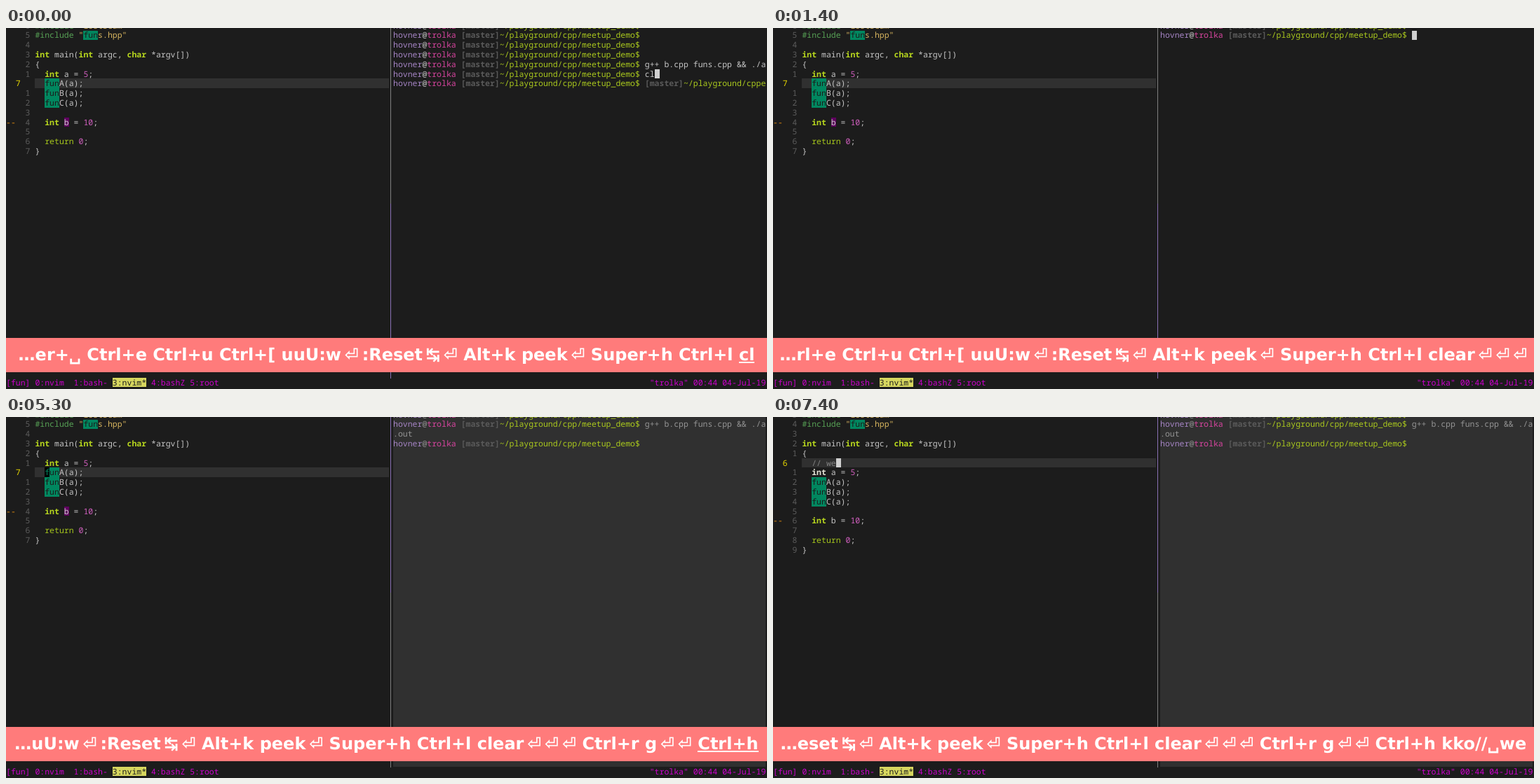
An HTML page that plays this animation: 1085x516 px, repeating every 8000 ms.

```html
<!DOCTYPE html>
<html lang="en">
<head>
<meta charset="utf-8">
<title>Terminal session</title>
<style>
  html, body { margin: 0; width: 100%; height: 100%; overflow: hidden; background: #1c1c1c; }
  svg { display: block; width: 1085px; height: 516px; }
  text { white-space: pre; text-rendering: geometricPrecision; }
  rect { shape-rendering: crispEdges; }
  #screen { font: 11.5px "Noto Sans Mono", "DejaVu Sans Mono", monospace; }
  #keys { font: bold 24px "DejaVu Sans", sans-serif; fill: #fff; text-anchor: middle; }
</style>
</head>
<body>
<svg viewBox="0 0 1085 516">
  <rect width="1085" height="516" fill="#1c1c1c"/>
  <g id="screen"></g>
  <rect y="443" width="1085" height="49" fill="#ff7b7b"/>
  <text id="keys" x="542.5" y="475"></text>
  <rect id="underline" y="477" height="2" fill="#fff"/>
</svg>
<script>
const LOOP = 8000, CW = 6.9, RH = 13.78, TOP = -10.2;
const USER = 'hovner', HOST = 'trolka';
const screen = document.getElementById('screen');
const keys = document.getElementById('keys');
const underline = document.getElementById('underline');

// name: [colour, weight, cell colour]
const styles = {
  text: ['#c6c6c6'], dim: ['#949494'], bright: ['#eeeeee', 'bold'],
  type: ['#b8d71e', 'bold'], pale: ['#e4e4d8', 'bold'], stmt: ['#a5c51c'],
  pre: ['#57a155'], str: ['#d7b55f'], num: ['#d05fbe'], comment: ['#808080'],
  hit: ['#1c1c1c', '', '#00875f'], word: ['#d0d0d0', '', '#5f005f'],
  cursor: ['#1c1c1c', '', '#d0d0d0'], match: ['#00875f', '', '#000000'],
  lineNo: ['#5c5c5c'], hereNo: ['#e8d800'], sign: ['#e08a10'],
  user: ['#a584c4'], host: ['#d7459f'], branch: ['#5a5a5a', 'bold'], path: ['#aac81e'],
  pointer: ['#d7005f', 'bold'], info: ['#a0a078'], ask: ['#87b7d7', 'bold'],
  bar: ['#cd00cd'], tab: ['#1c1c1c', '', '#d7d75f'],
};

const esc = s => s.replace(/&/g, '&amp;').replace(/</g, '&lt;');
const box = (x, y, w, h, fill) => `<rect x="${x}" y="${y}" width="${w}" height="${h}" fill="${fill}"/>`;
const cells = (col, row, n, fill, rows = 1) => box(col * CW, TOP + row * RH, n * CW, rows * RH, fill);

// Runs are plain strings or [text, style].
function line(col, row, runs, base = 'text') {
  let out = '';
  for (const run of runs) {
    const [s, name] = Array.isArray(run) ? run : [run, base];
    const [fill, weight, bg] = styles[name];
    if (bg) out += cells(col, row, s.length, bg);
    out += `<text x="${(col * CW).toFixed(2)}" y="${(TOP + row * RH + 10.9).toFixed(2)}" fill="${fill}"` +
      (weight ? ` font-weight="${weight}"` : '') + `>${esc(s)}</text>`;
    col += s.length;
  }
  return out;
}

const call = (name, first) => ['  ', ...(first || [['fun', 'hit']]), `${name}(a);`];

function editor(t) {
  const inserting = t >= 6000, active = t >= 5300;
  const cur = inserting ? 5 : t >= 5700 ? 4 : 6;
  const onMatch = active && cur === 6 && [['f', 'match'], ['un', 'hit']];
  const lines = [
    [['#include ', 'pre'], ['<iostream>', 'str']],
    [['#include ', 'pre'], ['"', 'str'], ['fun', 'hit'], ['s.hpp"', 'str']],
    [],
    [['int', 'type'], ' main(', ['int', 'type'], ' argc, ', ['char', 'type'], ' *argv[])'],
    [cur === 4 ? ['{', 'cursor'] : '{'],
    ['  ', ['int', inserting ? 'pale' : 'type'], ' a = ', ['5', 'num'], ';'],
    call('A', onMatch),
    call('B'),
    call('C'),
    [],
    ['  ', ['int', 'type'], ' ', ['b', inserting ? 'text' : 'word'], ' = ', ['10', 'num'], ';'],
    [],
    ['  ', ['return', 'stmt'], ' ', ['0', 'num'], ';'],
    ['}'],
  ];
  if (inserting) {
    const note = t >= 7400 ? '// we' : t >= 7000 ? '// w' : t >= 6500 ? '// ' : '';
    lines.splice(5, 0, ['  ', [note, 'comment'], [' ', 'cursor']]);
  }
  let out = cells(6, cur, 73.1, '#303030');
  lines.forEach((runs, i) => {
    out += i === cur
      ? line(2, i, [[String(i + 1), 'hereNo']])
      : line(3, i, [[String(Math.abs(i - cur)).padStart(2), 'lineNo']]);
    out += line(6, i, runs);
  });
  return out + line(0, inserting ? 11 : 10, [['--', 'sign']]);
}

const WHERE = [['[master]', 'branch'], ['~/playground/cpp/meetup_demo$', 'path'], ' '];
const prompt = (row, tail = [], base) =>
  line(80, row, [[USER, 'user'], '@', [HOST, 'host'], ' ', ...WHERE, ...tail], base);
const caret = [' ', 'cursor'];
const build = 'g++ b.cpp funs.cpp && ./a';

const past = ['cd ~', 'keyboard_setup.sh', 'fg', 'vi ~/.config/i3/config', 'run-tmux.sh fun',
  'g++ a.cpp && ./a.out', 'claer', 'g++ a.cpp && ./a.out', '', 'g++ b.cpp && ./a.out',
  'g++ b.cpp funs.hpp && ./a.out', 'g++ b.cpp funs.cpp && ./a.out', 'clear'];

function finder() {
  let out = prompt(0) + prompt(1, ['`__fzf_history__`']);
  out += cells(80, 2, 1, '#303030', 13) + cells(80, 14, 14, '#303030');
  past.forEach((cmd, i) => {
    const last = i === past.length - 1;
    out += line(83, i + 2, [`${1975 + i}${cmd ? '  ' + cmd : '*'}`], last ? 'bright' : 'text');
  });
  return out + line(80, 14, [['>', 'pointer']]) + line(82, 15, [['997/997 +S', 'info']]) +
    line(80, 16, [['>', 'ask'], ' ', caret]);
}

function shell(t) {
  let out = '';
  if (t < 800) {
    const typed = 'clear'.slice(0, t < 200 ? 2 : t < 300 ? 3 : t < 400 ? 4 : 5);
    for (let r = 0; r < 4; r++) out += prompt(r);
    return out + prompt(4, [build]) + prompt(5, [typed, caret]) +
      prompt(6, [['[master]', 'branch'], ['~/playground/cppe', 'path']]);
  }
  if (t < 1000) return out;
  if (t < 1200) return prompt(0, [caret]);
  if (t < 2400) return prompt(0) + prompt(1, [caret]);
  if (t < 3900) return finder();
  const idle = t >= 5300, base = idle ? 'dim' : 'text';
  if (idle) out += box(552, 0, 531, 499.6, '#303030');
  return out + prompt(0, [], base) + prompt(1, [build], base) + line(80, 2, ['.out'], base) +
    prompt(3, idle ? [] : [caret], base);
}

function frame(t) {
  const colors = ['#808080', '#8a70b4'];
  if (t >= 5300) colors.reverse();
  return box(548, 0, 1, 251, colors[0]) + box(548, 251, 1, 250, colors[1]) +
    line(0, 37, ['[fun] 0:nvim  1:bash- ', ['3:nvim*', 'tab'], ' 4:bashZ 5:root'], 'bar') +
    line(133, 37, [`"${HOST}" 00:44 04-Jul-19`], 'bar');
}

const pressed = 'er+␣ Ctrl+e Ctrl+u Ctrl+[ uuU:w⏎:Reset↹⏎ Alt+k peek⏎ Super+h Ctrl+l clear⏎⏎⏎ Ctrl+r g⏎⏎ Ctrl+h kko//␣we';
// [start ms, first visible keys, last keys, underlined count]
const steps = [
  [0, 'er+␣', ' cl', 2], [200, 'er+␣', ' cle', 1], [300, 'r+␣', ' clea', 1],
  [400, '+␣', ' clear', 1], [500, '+␣', ' clear', 0], [700, 'Ctrl+e', ' clear⏎', 1],
  [800, 'Ctrl+e', ' clear⏎', 1], [1000, 'trl+e', ' clear⏎⏎', 1], [1100, 'rl+e', ' clear⏎⏎⏎', 1],
  [1200, 'rl+e', ' clear⏎⏎⏎', 1], [1400, 'rl+e', ' clear⏎⏎⏎', 0], [2400, 'rl+u', 'Ctrl+r', 6],
  [3900, 'trl+[', ' g⏎⏎', 0], [5300, 'uU:w', 'Ctrl+h', 6], [5700, ':w', ' kk', 1],
  [6000, '⏎:Reset', ' kko', 1], [6500, ':Reset', '//␣', 2], [7000, 'Reset', '␣w', 1],
  [7400, 'eset', '␣we', 0],
];

function showKeys([, head, tail, recent]) {
  const end = pressed.indexOf(tail) + tail.length;
  const s = ('…' + pressed.slice(pressed.indexOf(head), end))
    .replace(/(?<=[^ ])(?=[⏎↹])|(?<=[⏎↹])(?=[^ ])/g, '\u2009');
  keys.textContent = s;
  let x = 0, w = 0;
  if (recent) {
    x = keys.getStartPositionOfChar(s.length - recent).x;
    w = keys.getEndPositionOfChar(s.length - 1).x - x;
  }
  underline.setAttribute('x', x);
  underline.setAttribute('width', w);
}

let shown = -1;
function draw(t) {
  let i = steps.length - 1;
  while (steps[i][0] > t) i--;
  if (i === shown) return;
  shown = i;
  const at = steps[i][0];
  screen.innerHTML = editor(at) + shell(at) + frame(at);
  showKeys(steps[i]);
}

const start = performance.now();
function tick() {
  draw((performance.now() - start) % LOOP);
  requestAnimationFrame(tick);
}
tick();
</script>
</body>
</html>
```
